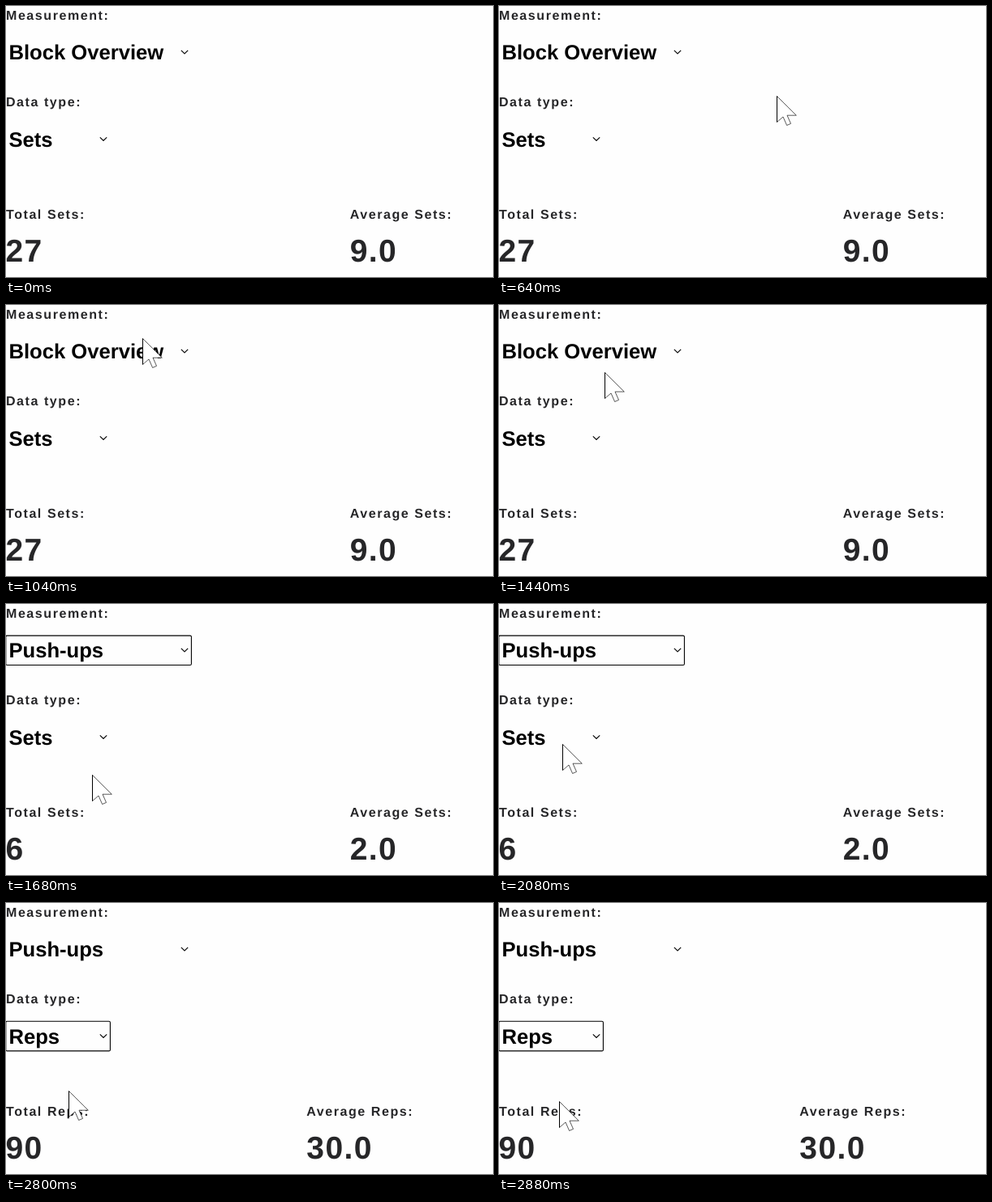
Write an HTML page that moves like this. It is 600x335 px and loops after 3.04 s.

```html
<!DOCTYPE html>
<html lang="en">
<head>
<meta charset="utf-8">
<title>Block overview</title>
<style>
  html, body { margin: 0; width: 100%; height: 100%; overflow: hidden; background: #fefefe; }
  svg { display: block; width: 100%; height: 100%; }
  text { font-family: "Liberation Sans", Arial, sans-serif; font-weight: bold; text-rendering: geometricPrecision; }
  .label { font-size: 16px; letter-spacing: 1.57px; fill: #262628; }
  .pick { font-size: 25.6px; fill: #000; }
  .value { font-size: 39px; letter-spacing: 1.4px; fill: #262628; }
  .line { fill: none; stroke: #000; stroke-width: 1.1; }
</style>
</head>
<body>
<svg viewBox="0 0 600 335" preserveAspectRatio="none">
  <text class="label" x="0" y="17">Measurement:</text>
  <text class="pick" id="measure" x="3.5" y="66.4"></text>
  <path class="line" d="M215.8 54.8l4.2 4.2 4.2-4.2"/>
  <rect class="line" id="measureBox" x="-.2" y="39.1" width="228.6" height="36.4" rx="1.5"/>

  <text class="label" x="0" y="124">Data type:</text>
  <text class="pick" id="type" x="3.5" y="173.6"></text>
  <path class="line" d="M115.8 162.3l4.2 4.2 4.2-4.2"/>
  <rect class="line" id="typeBox" x="-.2" y="146.3" width="128.6" height="36.6" rx="1.5"/>

  <text class="label" id="totalLabel" x="0" y="263.3"></text>
  <text class="value" id="total" x="-.5" y="316"></text>
  <text class="label" id="meanLabel" y="263.3"></text>
  <text class="value" id="mean" y="316"></text>

  <g id="cursor" stroke="#000">
    <path d="M.5 .5V32.5L8 26l4.6 10.5 4.9-2.1L13 24.2H24.3Z" fill="#fff" stroke-opacity=".65"/>
    <path d="M.5 .5V32.5"/>
  </g>
</svg>
<script>
const LOOP = 3040, STEP = 80, BLOCKS = 3;
const $ = id => document.getElementById(id);
const easeOut = p => 1 - (1 - p) ** 3;

// The pointer glides to (x, y) between two times, or jumps when they are equal.
const legs = [
  { from: 640, to: 640, x: 342, y: 111 },
  { from: 640, to: 1040, x: 168, y: 41, bow: 8 },
  { from: 1120, to: 1280, x: 138, y: 72 },
  { from: 1440, to: 1440, x: 130, y: 83 },
  { from: 1680, to: 1680, x: 106, y: 211 },
  { from: 1840, to: 2320, x: 74, y: 167 },
  { from: 2480, to: 2480, x: 80, y: 187 },
  { from: 2800, to: 2800, x: 77, y: 232 },
  { from: 2800, to: 2880, x: 74, y: 245 }
];

// Each entry overrides the state before it.
const changes = [
  { at: 0, measure: "Block Overview", type: "Sets", total: 27, column: 423.7, focus: "" },
  { at: 1680, measure: "Push-ups", total: 6, focus: "measureBox" },
  { at: 2320, focus: "" },
  { at: 2800, type: "Reps", total: 90, column: 370.3, focus: "typeBox" }
];

function pointerAt(t) {
  let pos = null;
  for (const { from, to, x, y, bow = 0 } of legs) {
    if (t < from) break;
    const p = to > from ? Math.min(1, (t - from) / (to - from)) : 1;
    const e = easeOut(p), start = pos || { x, y };
    pos = {
      x: Math.round(start.x + (x - start.x) * e),
      y: Math.round(start.y + (y - start.y) * e - bow * Math.sin(Math.PI * p))
    };
  }
  return pos;
}

function draw(t) {
  const s = Object.assign({}, ...changes.filter(c => c.at <= t));
  $("measure").textContent = s.measure;
  $("type").textContent = s.type;
  $("total").textContent = s.total;
  $("mean").textContent = (s.total / BLOCKS).toFixed(1);
  $("totalLabel").textContent = `Total ${s.type}:`;
  $("meanLabel").textContent = `Average ${s.type}:`;
  for (const id of ["mean", "meanLabel"]) $(id).setAttribute("x", s.column);
  for (const id of ["measureBox", "typeBox"])
    $(id).style.visibility = s.focus === id ? "visible" : "hidden";

  const pos = pointerAt(t);
  $("cursor").style.visibility = pos ? "visible" : "hidden";
  if (pos) $("cursor").setAttribute("transform", `translate(${pos.x} ${pos.y})`);
}

const start = performance.now();
let last = -1;
function tick() {
  const t = Math.floor((performance.now() - start) % LOOP / STEP) * STEP;
  if (t !== last) draw(last = t);
  requestAnimationFrame(tick);
}
tick();
</script>
</body>
</html>
```
